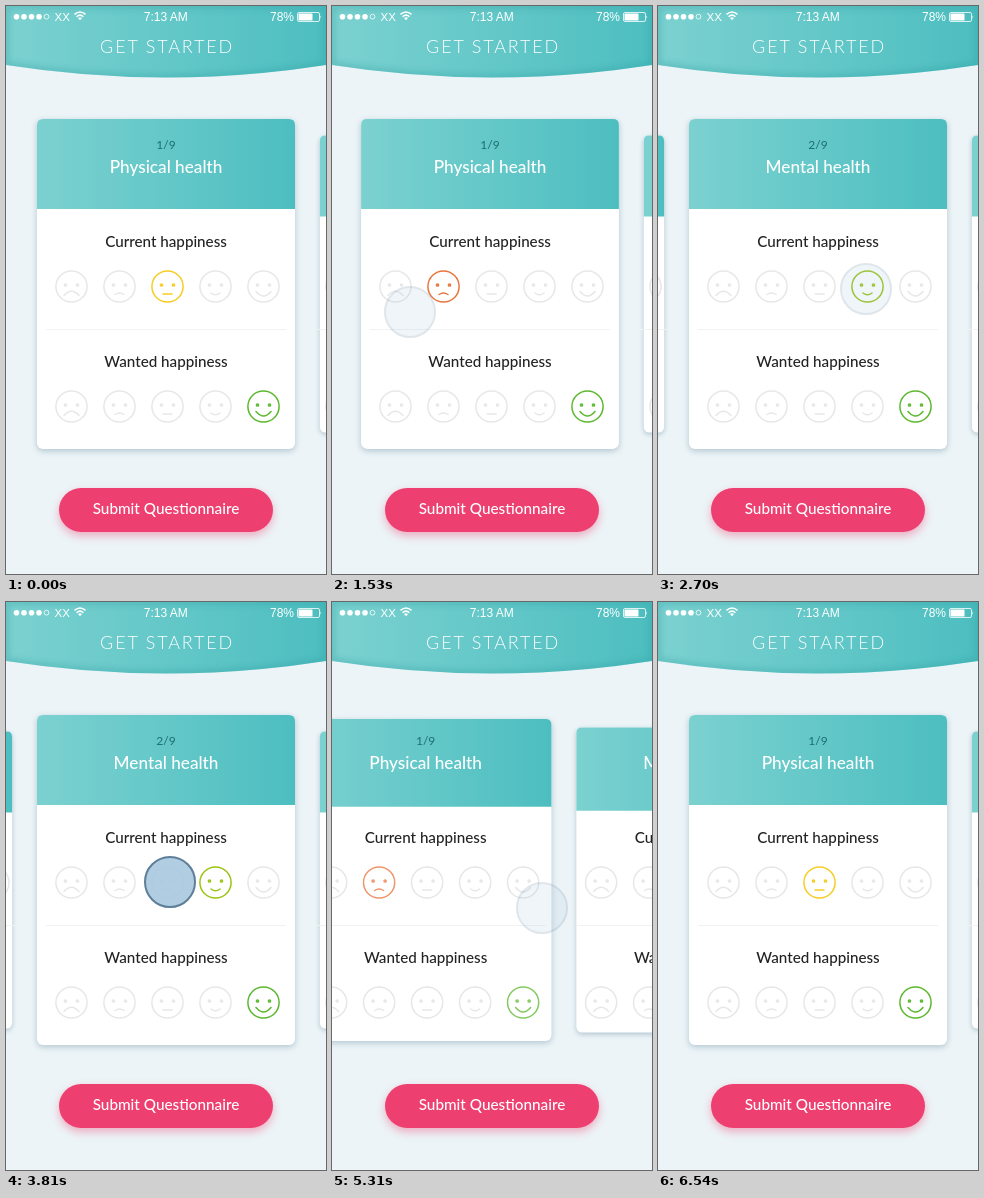
Animation of 320 by 568 pixels, one loop 7.2 s. Source, as an HTML page:

```html
<!DOCTYPE html>
<html lang="en">
<head>
<meta charset="utf-8">
<title>Happiness questionnaire</title>
<style>
  html, body { margin: 0; width: 100%; height: 100%; overflow: hidden; background: #ecf4f7; }
  svg { display: block; width: 320px; height: 568px; }
  text { font-family: Lato, "Open Sans", sans-serif; text-anchor: middle; }
  .status text { font: 12px "Liberation Sans", Arial, sans-serif; text-anchor: start; fill: #fff; }
  .panel { filter: drop-shadow(0 2px 3px rgba(90, 125, 150, .4)); }
  .button { filter: drop-shadow(0 4px 4px rgba(238, 64, 112, .4)); }
  .face { fill: none; stroke-width: 1.5; stroke-linecap: round; }
  .label { font-size: 15.2px; font-weight: 500; fill: #222; }
  .title { font-size: 17.2px; font-weight: 500; fill: #fff; }
  .count { font-size: 12px; fill: #1d6f74; }
</style>
</head>
<body>
<svg viewBox="0 0 320 568">
  <defs>
    <linearGradient id="teal">
      <stop stop-color="#7bd1d0"/><stop offset="1" stop-color="#4dbec0"/>
    </linearGradient>
    <path id="bar" d="M0 0H320V59Q160 84 0 59Z"/>
    <clipPath id="barClip"><use href="#bar"/></clipPath>
    <filter id="soft"><feGaussianBlur stdDeviation="3"/></filter>
  </defs>
  <rect width="320" height="568" fill="#ecf4f7"/>
  <g id="cards"></g>

  <use href="#bar" fill="url(#teal)"/>
  <g clip-path="url(#barClip)">
    <use href="#bar" fill="none" stroke="#2b9a9d" stroke-width="5" opacity=".4" filter="url(#soft)"/>
  </g>
  <text x="161" y="46.5" font-size="18" font-weight="300" letter-spacing="1.8" fill="#fff">GET STARTED</text>

  <g class="status" fill="#fff">
    <g id="signal"></g>
    <text x="48.5" y="14.5" style="font-size:11.5px">XX</text>
    <g fill="none" stroke="#fff" stroke-width="1.5">
      <path d="M68.5 8.4Q74 3.6 79.5 8.4M70.6 10.7Q74 7.6 77.4 10.7"/>
    </g>
    <path d="M72 12.1Q74 10.4 76 12.1L74 14.3Z"/>
    <text x="137.8" y="14.5">7:13 AM</text>
    <text x="264" y="14.5">78%</text>
    <rect x="291.5" y="6.5" width="22" height="9" rx="1.5" fill="none" stroke="#fff" stroke-width=".8"/>
    <rect x="292.5" y="7.5" width="14" height="7" rx=".6"/>
    <path d="M314.5 9.3q1.4 1.7 0 3.4z"/>
  </g>

  <rect class="button" x="53" y="482" width="214" height="44" rx="22" fill="#ee4070"/>
  <text x="160" y="508" font-size="15.3" font-weight="500" fill="#fff">Submit Questionnaire</text>
  <circle id="touch" r="25" fill="#a9c8de" fill-opacity=".9" stroke="#5d7f99" stroke-width="2"/>
</svg>
<script>
const LOOP = 7200, SPACING = 270, FADE = 150, GREY = '#e7e7e7';
const $ = id => document.getElementById(id);

const moods = [
  { mouth: 'M-7.5 9Q0 .5 7.5 9', color: '#dd4b39' },
  { mouth: 'M-4.5 8Q0 5 4.5 8', color: '#e8743b' },
  { mouth: 'M-4.5 7.5H4.5', color: '#f6cd24' },
  { mouth: 'M-4.5 6.5Q0 10 4.5 6.5', color: '#9bc416' },
  { mouth: 'M-7.5 5Q0 14 7.5 5', color: '#5cb82e' }
];
const titles = ['Physical health', 'Mental health', ''];

// Touches: press and release times, then the path between them.
const touches = [
  { down: 330, up: 390, x: 113, y: 281 },
  { down: 1320, up: 1410, x: 226, y: 306, toX: 78 },
  { down: 2520, up: 2580, x: 208, y: 283 },
  { down: 3810, up: 3900, x: 164, y: 280 },
  { down: 5130, up: 5190, x: 98, y: 306, toX: 210 },
  { down: 6330, up: 6390, x: 161, y: 280 }
];

const clamp = v => Math.min(1, Math.max(0, v));
const progress = (t, from, to) => clamp((t - from) / (to - from));
const easeOut = p => 1 - (1 - p) ** 2;

const face = ({ mouth }, i, y) => `
  <g class="face" transform="translate(${48 * i - 94.5} ${y})">
    <circle r="15.6"/><path d="${mouth}"/>
    <circle cx="-6" cy="-1.5" r="1.1"/><circle cx="6" cy="-1.5" r="1.1"/>
  </g>`;
const row = y => `<g class="row">${moods.map((m, i) => face(m, i, y)).join('')}</g>`;

$('signal').innerHTML = [0, 1, 2, 3, 4].map(i =>
  `<circle cx="${10.5 + 7.5 * i}" cy="10.7" r="${i < 4 ? 2.8 : 2.4}"
    ${i < 4 ? '' : 'fill="none" stroke="#fff" stroke-width=".8"'}/>`).join('');

$('cards').innerHTML = titles.map((title, i) => `
  <g class="card">
    <g class="panel">
      <rect x="-129" y="-165" width="258" height="330" rx="6" fill="#fff"/>
      <path d="M-129 -75V-159q0 -6 6 -6H123q6 0 6 6V-75Z" fill="url(#teal)"/>
    </g>
    <text class="count" y="142.5">${i + 1}/9</text>
    <text class="title" y="167">${title}</text>
    <text class="label" y="241">Current happiness</text>
    <text class="label" y="361">Wanted happiness</text>
    <path d="M-120 323.5H120" stroke="#f2f2f2"/>
    ${row(280.5)}${row(400.5)}
  </g>`).join('');

const cards = [...document.querySelectorAll('.card')].map(el => ({
  el,
  panel: el.querySelector('.panel'),
  rows: [...el.querySelectorAll('.row')].map(r => [...r.children])
}));

function paintRow(faces, chosen, visibility) {
  faces.forEach((el, i) => {
    const on = i === chosen;
    el.setAttribute('stroke', on ? moods[i].color : GREY);
    el.setAttribute('opacity', on ? visibility : 1);
  });
}

function draw(t) {
  const page = easeOut(progress(t, 1530, 1800)) - easeOut(progress(t, 5190, 5430));
  const current = [
    t >= 390 && t < 6390 ? 1 : 2,
    t >= 2580 && t < 3900 ? 3 : 2,
    2
  ];
  cards.forEach(({ el, panel, rows }, i) => {
    const offset = i - page, away = clamp(Math.abs(offset));
    el.setAttribute('transform', `translate(${160 + offset * SPACING} 0)`);
    panel.setAttribute('transform', `translate(0 278) scale(${1 - .1 * away})`);
    paintRow(rows[0], current[i], 1 - away);
    paintRow(rows[1], 4, 1 - away);
  });

  const touch = touches.find(p => t >= p.down && t < p.up + FADE);
  $('touch').setAttribute('opacity', touch ? 1 - progress(t, touch.up, touch.up + FADE) : 0);
  if (touch) {
    const { x, y, toX = x, down, up } = touch;
    $('touch').setAttribute('cx', x + (toX - x) * progress(t, down, up));
    $('touch').setAttribute('cy', y);
  }
}

const start = performance.now();
function tick() {
  draw((performance.now() - start) % LOOP);
  requestAnimationFrame(tick);
}
tick();
</script>
</body>
</html>
```
